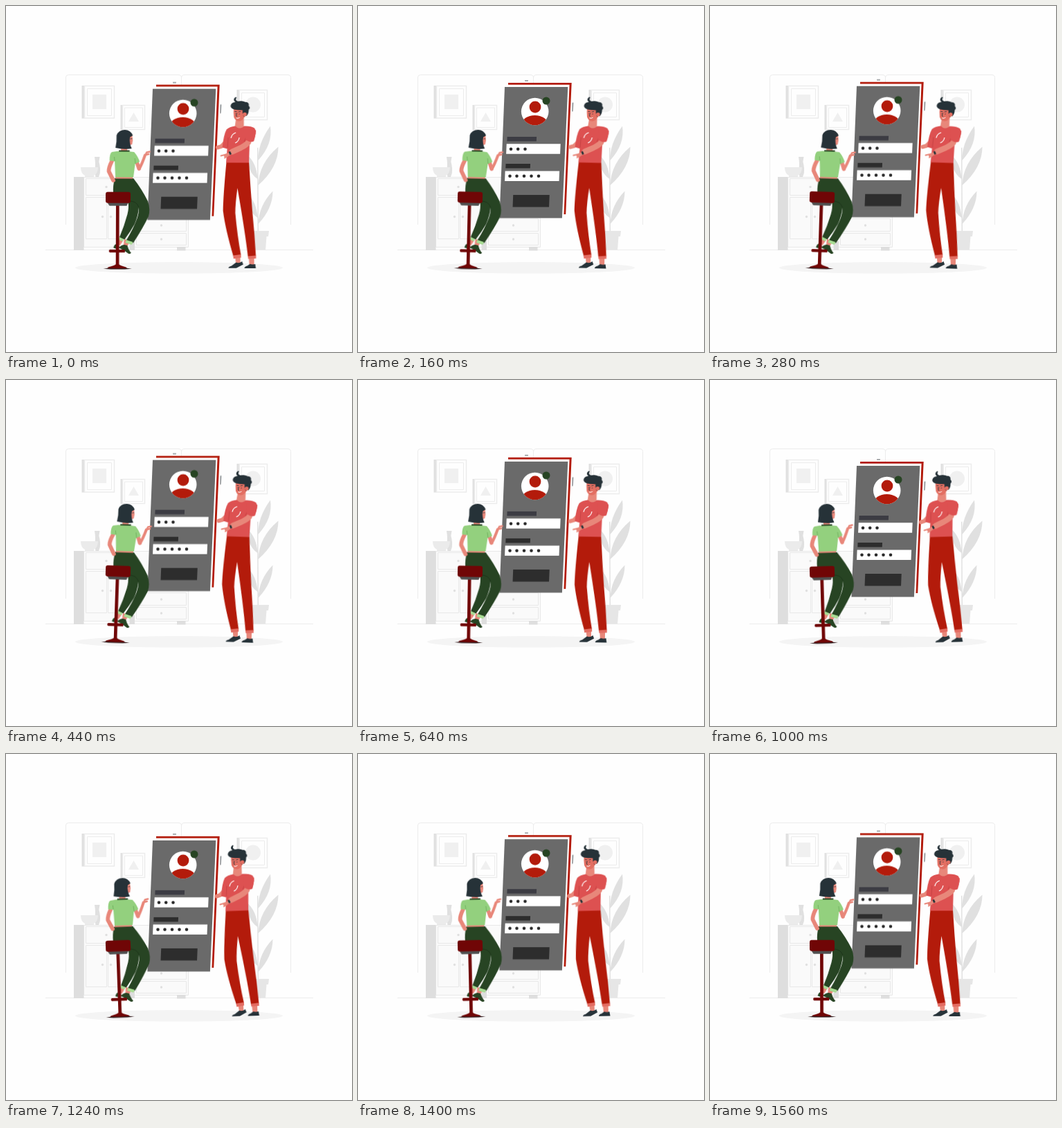
These frames come from a looping animation (500 px wide and 500 px high, 1600 ms). An HTML page:

```html
<!DOCTYPE html>
<html lang="en">
<head>
<meta charset="utf-8">
<title>Sign-in panel</title>
<style>
  html, body { margin: 0; width: 100%; height: 100%; overflow: hidden; background: #fefefe; }
  svg { display: block; width: 100%; height: 100%; }

  .panel, .man, .woman { animation: 800ms cubic-bezier(.364, 0, .636, 1) -428ms infinite alternate; }
  .panel { animation-name: bob; }
  .man   { animation-name: sway; transform-origin: 337px 248px; }
  .woman { animation-name: sway; transform-origin: 176px 276px; }
  @keyframes bob  { from { transform: translateY(5px); }   to { transform: translateY(-4.6px); } }
  @keyframes sway { from { transform: rotate(-2.1deg); }   to { transform: rotate(2deg); } }

  .line { fill: none; stroke: #ececec; stroke-width: 1; }
  .soft { fill: #f0f0f0; }
  .grey { fill: #e0e0e0; }
  .box  { fill: #fafafa; stroke: #e8e8e8; }
  .ink  { fill: #263238; }
  .red  { fill: #b31b0b; }
  .shirt { fill: #dd5151; }
  .skin { fill: #e8877a; }
  .limb { fill: none; stroke: #e8877a; stroke-linecap: round; stroke-linejoin: round; }
  .pants { fill: #274423; }
  .seat { fill: #700606; }
  .thin { fill: none; stroke: #263238; stroke-width: .8; stroke-linecap: round; }
</style>
</head>
<body>
<svg viewBox="0 0 500 500">
  <defs>
    <clipPath id="disc"><circle cx="255.700" cy="155.500" r="19.800"/></clipPath>
  </defs>

  <!-- room -->
  <path class="line" d="M86.500 316V103q0-3.500 4-3.500H249q4.500 0 4.500 4V316M253.500 316V104q0-4.500 4.500-4.500H407q4.500 0 4.500 4V316M57 352.500H444"/>

  <g>
    <path class="grey" d="M109.500 115h4v47.500h-4zM165.500 143h3v36h-3zM333.500 121h4v44h-4z"/>
    <path class="line" style="stroke-width:1.500" d="M113.500 115.500h43v46.500h-43zM168.500 143.500h32v35h-32zM337 121.500h40.500v43H337z"/>
    <path class="line" d="M117.500 119.500h35v39h-35zM171.500 147h26v28.500h-26zM340.500 125.500h33v35h-33z"/>
    <path class="soft" d="M125 128h20v21h-20zM184.500 154l7.500 13h-15z"/>
    <circle class="soft" cx="357" cy="142.500" r="11"/>
  </g>

  <g>
    <path class="box" d="M112.500 247.500h151v101h-151zM115.500 249.500h70v24h-70zM115.500 276.500h30v60h-30zM147.500 276.500h38v60h-38zM188.500 307.500h72v18h-72zM188.500 328.500h72v17h-72z"/>
    <path fill="#dedede" d="M98 247h14.500v106H98zM178.500 340h7.500v13h-7.500zM247 348h12.500v5.500H247z"/>
    <g class="grey">
      <circle cx="145" cy="261.500" r="1.700"/><circle cx="139.500" cy="304.500" r="1.700"/>
      <circle cx="151.500" cy="304.500" r="1.700"/><circle cx="224.500" cy="317" r="1.700"/>
      <circle cx="224.500" cy="337" r="1.700"/>
      <path d="M128 218h7.500l-1.200 7q2.600 9 1.400 17l-1.700 5h-4.500l-1.500-9q2-8 0-20z"/>
    </g>
    <path fill="#ebebeb" d="M108 233h25q0 9-6 12v2h-13v-2q-6-3-6-12z"/>
  </g>

  <g class="grey">
    <path d="M363.500 325L363 205l1.400-.5.600 120.500zM364.500 223q-1-24 17.500-49.500q4 26-17.500 49.500zM364.500 259q1-32 29-55.500q0 30-29 55.500zM364.500 315q1-27 21-47.500q0 25-21 47.500zM363.500 250q-14-9-16-36q15 13 16 36zM363.500 306q-14-9-16-36q15 13 16 36z"/>
    <path fill="#e6e6e6" d="M351 325h29l-1 8h-27zM354.500 333h22l-1.500 19.500h-19z"/>
  </g>
  <ellipse cx="250" cy="378.300" rx="150" ry="8.300" fill="#f4f4f4"/>

  <!-- sign-in panel -->
  <g class="panel">
    <path fill="#fefefe" d="M217 115h91l-8 188h-91z"/>
    <path class="red" d="M217 114h91.700L300.200 304H297.500L305.600 116.800H217z"/>
    <path class="thin" d="M241.500 111h4M310.600 143l-.7 12"/>
    <path fill="#6a6a6a" d="M212 120h91.300L294.900 309.500H204.400z"/>
    <g transform="translate(212 120) skewX(-2.3)">
      <path fill="#3c3c43" d="M6.500 72h42.500v6.500H6.500z"/>
      <path fill="#2d2d2d" d="M6 111h35.500v6.500H6zM18.500 156h52.500v17.500H18.500z"/>
      <path fill="#fff" d="M6 82.300h78v14.500H6zM5.500 121.500h78.500V136H5.500z"/>
    </g>
    <circle cx="255.700" cy="155.500" r="19.800" fill="#fff"/>
    <g class="red">
      <circle cx="256" cy="149" r="8.400"/>
      <ellipse cx="255.500" cy="174" rx="19" ry="13" clip-path="url(#disc)"/>
    </g>
    <circle class="pants" cx="272" cy="140" r="5.500"/>
    <path fill="none" stroke="#2b2b2b" stroke-width="4.600" stroke-linecap="round" d="M221 209.700h.01M231.200 209.700h.01M241.500 209.700h.01M219.500 248.800h.01M229.500 248.800h.01M240 248.800h.01M250.500 248.800h.01M261 248.800h.01"/>
  </g>

  <!-- standing man -->
  <g class="man">
    <path class="limb" stroke-width="6" d="M317 197l-6 6l-5 1.500"/>
    <path class="skin" d="M331 360h8v11l-6 3zM351 361h8v13h-7z"/>
    <path class="ink" d="M322 378.800q0-2 4-3l7-5.300q4 2 8.500-1.500l1.700 4.500l-10 5.300zM345 379q0-2.500 4-3.500l4-2.700q4 1.500 7.500 0l1 6.200z"/>
    <path class="red" d="M318.500 225h32.500q2 34 5 70q3.500 34 5.500 66.500l-11.500 1Q346 328 334.500 263q-3 22-3 36q3 33 8.500 61.500l-11 1.500Q317 322 313.800 296q0-20 4.700-71z"/>
    <path fill="#e36c62" d="M328.500 360.500l11.200-1.500l.5 4.500l-11 1.700zM349.800 361.500l11.700-1l.3 4.300l-11.400.7z"/>
    <path class="skin" d="M332.500 160h11v14q-6 6-13 0z"/>
    <path class="shirt" d="M331 173.500q6 6 13 0q10-.5 15 3q3.500 5-1 19h-6l-1 31h-33l1.500-20l-7-2q2-19 6-26q4-4 12.500-5z"/>
    <path fill="none" stroke="#bd3b3d" stroke-width=".7" d="M348 178q1 9-4 18M320 205l1-15"/>
    <path fill="none" stroke="#fff" stroke-width="1.200" d="M325 191q1-6 7-8M337 190q-1 6-6 8"/>
    <path class="limb" stroke-width="8" d="M350 197q-3 4-11 8l-12 5.500"/>
    <path class="limb" stroke-width="4.500" d="M329 210l-8 4.500l-4 2"/>
    <path class="limb" stroke-width="2" d="M320 214l-9.500 2.500M320 217l-4 2.500"/>
    <path class="shirt" d="M346 176q9-4 15 4q0 7-4.500 16q-6 1.500-11-4z"/>
    <path class="ink" d="M321.500 211l2.500-1l1.800 4l-2.500 1.200z"/>

    <path fill="#e36f62" d="M329 146h18q1 11-3 15q-3 5-7 5.500q-6 0-8-6q-1-7 0-14.500z"/>
    <path class="ink" d="M329 149.500q-7-2.500-4-7.500q2-3 6-3q-4.500-4 .5-7.500q1.500 0 1.200 1q-2.300 3.500 1.800 5.300q7-1.500 11 1q6 0 5 5.500q3 3 0 5.500q0 6-3 9l-4.500.7q-2-4-1.500-9q-7.500 0-12.500-1z"/>
    <circle cx="344.800" cy="156.500" r="2.800" fill="#e36f62"/>
    <path class="thin" d="M330.500 152.500l2.500.3M336 153l2.500-.5M332 155.500v.6M337 155.800v.6M333.500 155l-1.300 4l1.500.3"/>
    <path fill="none" stroke="#fff" stroke-width="1" d="M332.500 162q3 1 5-1"/>
  </g>

  <!-- seated woman on stool -->
  <g class="woman">
    <path class="pants" d="M155.500 349.500q1-5 5-6l3.500 4l-3 4z"/>
    <path class="skin" d="M171 337l9 2l-5 9l-5-1zM163 336l7 2l-5 8l-3-1z"/>
    <path class="pants" d="M157 249H184Q196 264 205 282Q209 294 206 304Q198 321 184 342.500L174 338.500Q184 322 189.500 307Q192.500 298 192 291Q191 303 186 315Q180 326 171.500 337.500L164 334.500Q171 318 175.500 301Q178 291 176.500 284H160Q151.500 272 157 249z"/>
    <path fill="none" stroke="#1b3219" stroke-width=".8" d="M176 282q13-1 16 9"/>
    <path fill="#a8dc93" d="M164.200 334l6 3l-1.300 3.500l-6-3zM174 338l9.500 3l-1.500 4l-9.500-3z"/>
    <path class="pants" d="M163 349.500q3-4 8-4.500l4.500 1q2 7 5.500 10.500q-1 2.500-4 1.300l-7-5z"/>

    <path class="seat" d="M159 288h4.700v64h8.300v4.300h-8.300v17q1 2 10.300 4.200l1 1.500h-28l1-1.500q9.500-2.200 11-4.200v-17h-9q-2-2.200 0-4.300h9z"/>
    <path fill="#30191b" d="M141 379.700q20-4 41 0q-20 1.800-41 0z"/>
    <path class="seat" d="M148 378.500q13-4.500 26.500 0q-13 1.500-26.500 0z"/>
    <path fill="#505050" d="M146.500 284h30l-2 4.800h-25z"/>
    <rect class="seat" x="144" y="268.800" width="36" height="16" rx="3"/>

    <path class="skin" d="M158 246h25v3.500h-25zM166 203h9v9h-9z"/>
    <path class="limb" stroke-width="5.800" d="M153 224q-5 10-4.500 15l6.500 13"/>
    <path class="limb" stroke-width="5.500" d="M188.500 224l3.500 11"/>
    <path class="limb" stroke-width="4" d="M192.300 235.500q4-7 8.500-20"/>
    <path class="limb" stroke-width="2.400" d="M201 216l2-4.500l4.500-1M201.500 215l4.500-1"/>
    <path fill="#93d07e" d="M153 211q13-3 32 0q6 7 8 14l-6.500 3l-2.500 19.500H158l-1-23l-7.500-1q0-11 3.500-12.500z"/>
    <path fill="none" stroke="#65a754" stroke-width=".7" d="M157 224l-.7-6M187 228l-1-8"/>
    <path class="pants" d="M163 208.500h15.500v2H163z"/>
    <path class="skin" d="M174 186h8l1 8l-1 6l-7 2z"/>
    <path class="ink" d="M159.500 187q3-8 12-8q8 0 11.500 8l-4 2.500q-1.500 8 2.500 16.500q-11 2-23.500-1q2-9 1.500-18z"/>
    <path class="thin" d="M180 192l1.800-.3"/>
  </g>
</svg>
</body>
</html>
```
